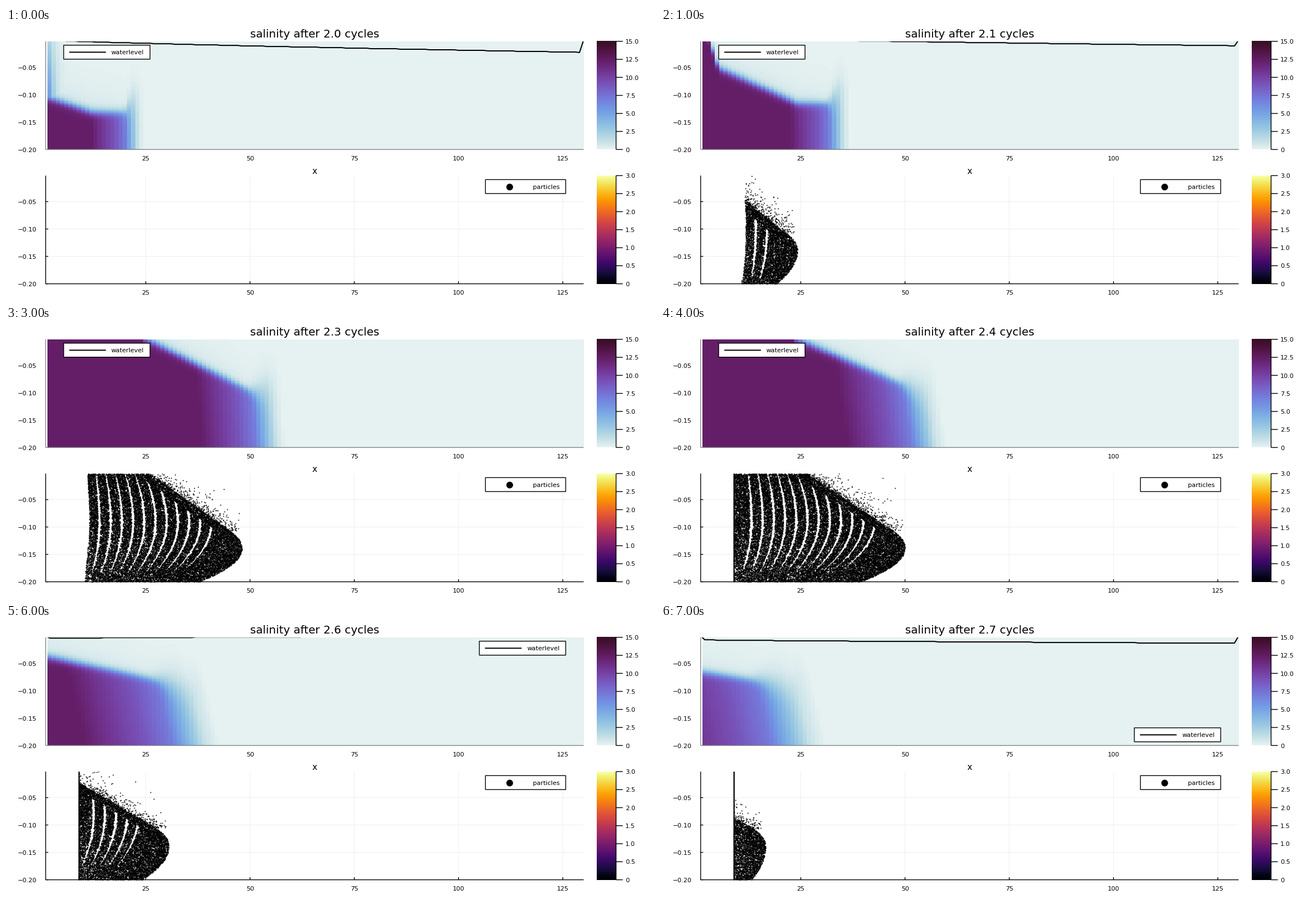
A matplotlib script that plays this animation: 1159x483 px, repeating every 8 s.

```python
import numpy as np
import matplotlib.pyplot as plt
from matplotlib.animation import FuncAnimation
from matplotlib.colors import LinearSegmentedColormap
from matplotlib.patches import Rectangle

W, H, DPI = 1159, 483, 100
PX = 72 / DPI                      # points per pixel
LEFT, UNIT = 70.8, 7.448           # pixel of x = 1, pixels per x
RIGHT = LEFT + 129 * UNIT
TOP_PANEL, LOW_PANEL = (23.8, 217.35), (264.0, 457.55)
X_TICKS = range(25, 126, 25)
Z_TICKS = (-0.05, -0.10, -0.15, -0.20)
FRAMES = 8
WALL = 130.3                       # pixel where returning particles stick

dense = LinearSegmentedColormap.from_list("dense", np.array([
    (230, 241, 241), (191, 221, 229), (156, 201, 226), (129, 180, 227),
    (115, 154, 228), (117, 127, 221), (120, 100, 202), (119, 74, 175),
    (113, 50, 141), (100, 31, 104), (80, 20, 66), (54, 14, 36)]) / 255)

# Bottom salinity across the front, as offsets from its tip.
LEVELS = [12.3, 11, 9, 7, 5, 3, 1, 0]
OFFSETS = [-15.5, -12.5, -7, -3.2, -1.7, 0, 1.6, 3.6]


def px(x):
    return LEFT + (np.asarray(x) - 1) * UNIT


def py(z, panel=TOP_PANEL):
    return panel[1] - (np.asarray(z) + 0.2) * 980


def tide(k, peak):
    return np.cos(2 * np.pi * (k - peak) / 10)


def salinity(k):
    x, z = np.meshgrid(np.arange(2, 131), -0.2 + 0.0025 * (np.arange(79)[::-1] + 0.5))
    tip = 35.4 + 20.8 * tide(k, 3.6)
    spread = 0.65 + 0.09 * k + 0.014 * k ** 2
    slant = 30 * np.clip((k - 2) / 3, 0, 1)
    base = np.interp((x + slant * (z + 0.2) - tip) / spread, OFFSETS, LEVELS)

    # Interface: flat toe, straight slope, fully mixed water at the open end.
    toe = -0.088 - 0.045 * np.exp(-k / 2.2)
    flat = 3 + 7 * np.exp(-(k / 2.6) ** 4)
    slope = 0.0025 + 0.0014 * tide(k, 2.4)
    mixed = tip - 28.5 - 0.2 * k ** 2
    surface = toe + slope * np.maximum(tip - x - flat, 0)
    surface += 0.02 * np.maximum(mixed - x, 0)
    surface += 0.03 * np.clip((x - tip + 2) / 3, 0, 1)

    depth = surface - z
    width = 0.004 + 0.014 * np.clip((7.5 - base) / 5, 0, 1)
    salt = 1 / (1 + np.exp(-np.clip(depth / width, -50, 50)))
    haze = np.exp(-np.maximum(-depth, 0) / 0.03)
    field = base * (0.93 * salt + 0.07 * haze)
    if k == 0:                     # inflow just starting at the open end
        field = np.maximum(field, (2 - 32 * z) * np.exp(-0.75 * (x - 2)))
    return field


def water_line(k):
    x = np.arange(1, 131)
    s = np.clip((x - 2) / 127, 0, 1) ** 0.75
    sea, river = -7.5 * tide(k, 7.5), -5 - 22.8 * tide(k, 8.9)
    z = np.round(sea + (river - sea) * s) / 1000
    z[[0, -1]] = 0
    return px(x), py(z)


def cloud_edge(y, k, tip):
    """Right edge of the cloud: straight upper slope, rounded nose below."""
    rise = np.maximum(362 - y, 0) * (1.1 + 0.1 * k)
    upper = 28 * np.clip((397 - y) / 35, 0, 1) ** 2
    lower = 0.2 * (tip - LEFT) * np.clip((y - 397) / 58, 0, 2) ** 2
    return tip - rise - upper - lower


def particles(k):
    if k == 0:
        return [], []
    rng = np.random.default_rng(40 + k)
    tip = px(27.4 + 23 * tide(k, 3.72))
    area = (tip - WALL) * 194
    x = rng.uniform(WALL, tip, int(0.9 * area))
    y = rng.uniform(*LOW_PANEL, x.size)
    right = cloud_edge(y, k, tip)
    s = (y - LOW_PANEL[0]) / 194
    left = 150 - 1.5 * k - 5 * s + 4 * np.sin(np.pi * s) if k < 4 else WALL

    # Older water near the bottom is thinner.
    age = np.clip((right - x) / (tip - WALL), 0, 1)
    keep = (x > left) & (x < right) & (rng.random(x.size) > 0.45 * s * age)

    # Pale gaps between releases, bent by the flow, one every 20 pixels.
    crest_y = 362 - 3.5 * k
    rel = (y - crest_y) / 82
    half = 2.5 * np.sqrt(np.clip(1 - (0.9 * rel) ** 2, 0, 1))
    for crest in np.arange(tip - 55, 145, -20):
        bend = np.where(rel < 0, 0.12 * (crest - 145) + k,
                        0.17 * (crest - 145) + 2.5 * k)
        keep &= (np.abs(x - crest + bend * rel ** 2) > half) | (right - x < 24)

    # Stray dots drift off above the sloping top.
    stray_y = rng.uniform(LOW_PANEL[0], 366, 380)
    stray_x = cloud_edge(stray_y, k, tip) + rng.exponential(15, stray_y.size)
    ok = (stray_x > np.max(left)) & (stray_x < tip - 5)
    x, y = np.append(x[keep], stray_x[ok]), np.append(y[keep], stray_y[ok])
    if k >= 4:
        wall = np.arange(*LOW_PANEL, 0.6)
        x, y = np.append(x, np.full(wall.size, WALL)), np.append(y, wall)
    return x, y


plt.rcParams["font.family"] = "DejaVu Sans"
fig = plt.figure(figsize=(W / DPI, H / DPI), dpi=DPI, facecolor="white")
ax = fig.add_axes([0, 0, 1, 1])
ax.axis("off")


def text(x, y, s, size=8, ha="center", **kw):
    return ax.text(x, y, s, fontsize=size, ha=ha, va="baseline", **kw)


def line(xs, ys, color="black", width=1.39, **kw):
    return ax.plot(xs, ys, color=color, lw=width * PX, solid_capstyle="butt",
                   snap=False, **kw)[0]


def clip_to(artist, panel):
    artist.set_clip_path(Rectangle((LEFT, panel[0]), RIGHT - LEFT,
                                   panel[1] - panel[0], transform=ax.transData))


def legend_box(x, y, w):
    return ax.add_patch(Rectangle((x, y), w, 25, fc="white", ec="black",
                                  lw=1.39 * PX, snap=False, zorder=5))


def frame_panel(panel, color):
    line([LEFT] * 2, panel, color)
    line([LEFT, RIGHT], [panel[1]] * 2, color)
    for z in Z_TICKS:
        text(54.5, py(z, panel) + 4.2, f"\u2212{-z:.2f}", ha="right")
    for x in X_TICKS:
        text(px(x), panel[1] + 19.6, str(x))


def colorbar(panel, cmap, top, step):
    ax.imshow(np.linspace(1, 0, 256)[:, None], cmap=cmap, aspect="auto",
              extent=(1054.5, 1089.5, panel[1], panel[0]), interpolation="nearest")
    line([1089.5] * 2, panel)
    for v in np.arange(0, top + step / 2, step):
        y = panel[1] - (panel[1] - panel[0]) * v / top
        line([1089.5, 1101.5], [y, y])
        text(1106, y + 4.2, f"{v:.1f}" if v else "0", ha="left")


frame_panel(TOP_PANEL, "#808888")
frame_panel(LOW_PANEL, "black")
colorbar(TOP_PANEL, dense, 15, 2.5)
colorbar(LOW_PANEL, "inferno", 3, 0.5)
text(551, 261, "x", 11)
title = text(551, 17.3, "", 14.3)

# Upper panel
heat = ax.imshow(salinity(0), cmap=dense, vmin=0, vmax=15, aspect="auto",
                 extent=(px(1.5) - 0.1, px(130.5), TOP_PANEL[1], TOP_PANEL[0]),
                 interpolation="nearest")
clip_to(heat, TOP_PANEL)
level = line([], [], width=2, zorder=4)
clip_to(level, TOP_PANEL)
key_box = legend_box(103, 30.7, 154.2)
key_line = line([], [], width=2, zorder=6)
key_text = text(188, 47, "waterlevel", ha="left", zorder=6)

# Lower panel
for x in X_TICKS:
    line([px(x)] * 2, LOW_PANEL, "#efefef", 1, zorder=1)
    line([px(x)] * 2, [LOW_PANEL[1] - 4.5, LOW_PANEL[1]])
for z in Z_TICKS:
    y = py(z, LOW_PANEL)
    line([LEFT, RIGHT], [y, y], "#efefef", 1, zorder=1)
    line([LEFT, LEFT + 4.5], [y, y])
dots, = ax.plot([], [], "o", color="black", ms=1.9 * PX, mew=0, zorder=3)
clip_to(dots, LOW_PANEL)
legend_box(856.2, 271.2, 143.3)
ax.plot(898.7, 284, "o", color="black", ms=12 * PX, mew=0, zorder=6)
text(940.5, 288, "particles", ha="left", zorder=6)

ax.set_xlim(0, W)
ax.set_ylim(H, 0)


def place_legend(x, y):
    key_box.set_xy((x, y))
    key_line.set_data([x + 10, x + 75.5], [y + 12.6] * 2)
    key_text.set_position((x + 85, y + 16.6))


def update(k):
    title.set_text(f"salinity after {2 + k / 10:.1f} cycles")
    heat.set_data(salinity(k))
    level.set_data(*water_line(k))
    dots.set_data(*particles(k))
    place_legend(103 if k < 6 else 845.3, 185.7 if k == 7 else 30.7)
    return title, heat, level, dots, key_box, key_line, key_text


anim = FuncAnimation(fig, update, frames=FRAMES, interval=1000, repeat=True,
                     repeat_delay=0, blit=False)
plt.show()
```
